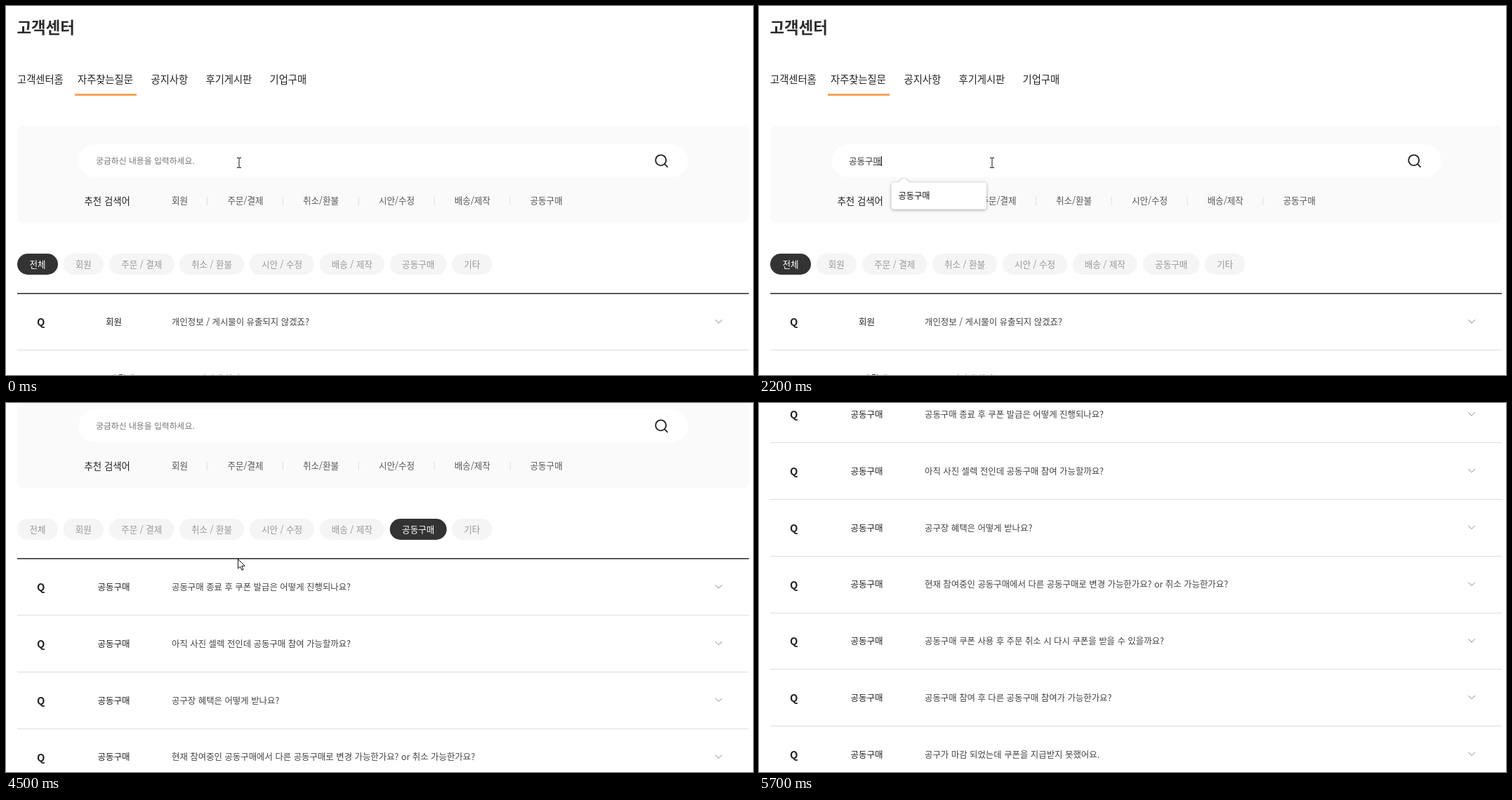
Write an HTML page that moves like this. It is 1064 by 526 pixels and loops after 6200 ms.

```html
<!DOCTYPE html>
<html lang="ko">
<head>
<meta charset="utf-8">
<title>고객센터</title>
<style>
html, body { margin: 0; width: 100%; height: 100%; overflow: hidden; background: #fff; }
svg { display: block; width: 1064px; height: 526px; }
text { font-family: "Noto Sans CJK KR", "Noto Sans CJK JP", "Noto Sans CJK", sans-serif; white-space: pre; }
</style>
</head>
<body>
<svg id="stage" viewBox="0 0 1064 526"></svg>
<script>
const LOOP = 6200, ROW = 80.75, BODY = 12.42;
const NS = 'http://www.w3.org/2000/svg';
const stage = document.getElementById('stage');

function add(parent, tag, attrs = {}) {
  const el = document.createElementNS(NS, tag);
  for (const k in attrs) el.setAttribute(k, attrs[k]);
  return parent.appendChild(el);
}
// Text placed by the vertical centre of its glyphs.
function label(parent, str, x, cy, size, fill, weight = 400, anchor = 'start') {
  const el = add(parent, 'text', {
    x, y: cy + size * 0.38, 'font-size': size, fill, 'font-weight': weight, 'text-anchor': anchor
  });
  el.textContent = str;
  return el;
}
const box = (parent, x, y, width, height, rx, fill) =>
  add(parent, 'rect', { x, y, width, height, rx, fill });
const line = (parent, d, stroke, w) =>
  add(parent, 'path', { d, stroke, 'stroke-width': w, fill: 'none' });
const show = (el, on) => el.setAttribute('visibility', on ? 'visible' : 'hidden');

const page = add(stage, 'g');

// Heading and tabs
label(page, '고객센터', 15.5, 30.5, 22.4, '#2b2b2b', 700);
[['고객센터홈', 16], ['자주찾는질문', 102], ['공지사항', 206.5], ['후기게시판', 284.5], ['기업구매', 375.5]]
  .forEach(([s, x]) => label(page, s, x, 105, 14.3, '#222', 300));
box(page, 98, 125, 88, 3, 0, '#f5a55a');

// Search panel
box(page, 16, 170.5, 1042, 139, 9, '#fafafa');
box(page, 103.5, 197, 868, 47, 23.5, '#fff');
const hint = label(page, '궁금하신 내용을 입력하세요.', 128, 220.5, 11.85, '#777', 300);
add(page, 'circle', { cx: 932.7, cy: 219.8, r: 7.5, fill: 'none', stroke: '#222', 'stroke-width': 1.8 });
line(page, 'M938.2 225.3L942.5 229.8', '#222', 1.8);
label(page, '추천 검색어', 111.5, 277.5, 13.4, '#222', 500);
[['회원', 236], ['주문/결제', 315.5], ['취소/환불', 423], ['시안/수정', 531], ['배송/제작', 638.8], ['공동구매', 746.5]]
  .forEach(([s, x], i) => {
    label(page, s, x, 277.5, 12.55, '#555', 300);
    if (i) box(page, 178 + i * 107.9, 272, 1, 12, 0, '#ddd');
  });

// Category pills
const pills = [['전체', 16, 58], ['회원', 81.5, 57.5], ['주문 / 결제', 147, 92.5], ['취소 / 환불', 246.7, 92.5],
  ['시안 / 수정', 347, 92], ['배송 / 제작', 446.7, 92], ['공동구매', 546.7, 81], ['기타', 635, 57.5]]
  .map(([s, x, w]) => ({
    bg: box(page, x, 353, w, 30, 15, '#f5f5f5'),
    txt: label(page, s, x + w / 2, 368, 12.55, '#999', 400, 'middle')
  }));
function pick(n) {
  pills.forEach((p, i) => {
    p.bg.setAttribute('fill', i === n ? '#333' : '#f5f5f5');
    p.txt.setAttribute('fill', i === n ? '#fff' : '#999');
    p.txt.setAttribute('font-weight', i === n ? 500 : 400);
  });
}

// Question lists
box(page, 16, 409, 1042, 1.6, 0, '#333');
function list(rows) {
  const g = add(page, 'g');
  rows.forEach(([cat, q], i) => {
    const y = 450.3 + i * ROW;
    label(g, 'Q', 49.7, y + 0.5, 14.8, '#222', 700, 'middle');
    label(g, cat, 153.5, y, 12.5, '#222', 500, 'middle');
    label(g, q, 236, y, BODY, '#444', 300);
    line(g, `M1010.3 ${y - 3}l4.8 4.8l4.8 -4.8`, '#888', 1);
    box(g, 16, Math.round(y + 40), 1042, 1, 0, '#ddd');
  });
  return g;
}
const allList = list([
  ['회원', '개인정보 / 게시물이 유출되지 않겠죠?'],
  ['주문 / 결제', '주문은 어떻게 하나요?']
]);
const groupList = list([
  '공동구매 종료 후 쿠폰 발급은 어떻게 진행되나요?',
  '아직 사진 셀렉 전인데 공동구매 참여 가능할까요?',
  '공구장 혜택은 어떻게 받나요?',
  '현재 참여중인 공동구매에서 다른 공동구매로 변경 가능한가요? or 취소 가능한가요?',
  '공동구매 쿠폰 사용 후 주문 취소 시 다시 쿠폰을 받을 수 있을까요?',
  '공동구매 참여 후 다른 공동구매 참여가 가능한가요?',
  '공구가 마감 되었는데 쿠폰을 지급받지 못했어요.'
].map(q => ['공동구매', q]));

// Typed value with caret and composing underline
const CHAR = 11.5;
const field = add(stage, 'g');
const typed = label(field, '', 128, 220.8, 12.5, '#333');
const under = box(field, 128, 226, CHAR, 1, 0, '#333');
const caret = box(field, 128, 214, 1, 14, 0, '#000');

// Suggestion popup
const popup = add(stage, 'g', { style: 'filter:drop-shadow(0 1px 2px rgba(0,0,0,.35))' });
add(popup, 'path', { d: 'M198 252l8.3 -7l8.3 7z', fill: '#fff' });
const sheet = box(popup, 188.5, 251.5, 135.5, 163, 4, '#fff');
const items = [0, 1, 2, 3, 4].map(i => label(popup, '', 198.5, 270.5 + i * 31.3, 12.2, '#111'));
function suggest(words) {
  sheet.setAttribute('height', 7 + words.length * 31.3);
  items.forEach((el, i) => el.textContent = words[i] || '');
}

// Pointers
const beam = line(stage, 'M329 216.5h2.5l.5 .5l.5 -.5h2.5M332 217v13M329 230.5h2.5l.5 -.5l.5 .5h2.5', '#111', 1);
const arrow = add(stage, 'path', {
  d: 'M330.5 222.5v13.5l3.1 -2.9l2.3 5.2l2.2 -1l-2.3 -5h4.3z',
  fill: '#fff', stroke: '#111', 'stroke-width': 1
});

const FIVE = ['공구', '공동구매', '공구가 마감', '공동', '공구장'];
const TWO = ['공동구매', '공동'], ONE = ['공동구매'], NONE = [];
// time, value, suggestions, composing
const typing = [
  [0, '', NONE, 0], [800, 'ㄱ', NONE, 1], [900, '고', NONE, 1], [1000, '공', NONE, 1],
  [1100, '공', FIVE, 1], [1300, '공ㄷ', FIVE, 1], [1600, '공도', NONE, 1], [1700, '공동', TWO, 1],
  [1800, '공동ㄱ', NONE, 1], [1900, '공동구', ONE, 1], [2000, '공동굼', NONE, 1],
  [2100, '공동구매', ONE, 1], [2300, '공동구매', NONE, 1], [2500, '공동구매', NONE, 0]
];
const scroll = [
  [0, 0], [4000, 27], [4100, 116], [4200, 161], [4500, 188], [4600, 277], [4700, 323],
  [4900, 326], [5000, 342], [5100, 369], [5200, 397], [5300, 418], [5400, 430], [5500, 434]
];
const at = (table, t) => table.filter(s => s[0] <= t).pop();

function draw(t) {
  const loaded = t >= 2700;
  const [, value, words, composing] = at(typing, t);
  const n = value.length;

  page.setAttribute('transform', `translate(0 ${-at(scroll, t)[1]})`);
  page.setAttribute('display', loaded && t < 2900 ? 'none' : 'inline');
  show(allList, !loaded);
  show(groupList, loaded);
  pick(loaded ? 6 : 0);
  show(hint, loaded || !n);

  field.setAttribute('display', loaded ? 'none' : 'inline');
  typed.textContent = value;
  caret.setAttribute('x', 128 + n * CHAR);
  show(caret, t >= 300);
  under.setAttribute('x', 128 + (n - 1) * CHAR);
  show(under, composing);

  popup.setAttribute('display', !loaded && words.length ? 'inline' : 'none');
  suggest(words);
  show(beam, !loaded);
  show(arrow, loaded && t < 5600);
}

const start = performance.now();
function tick() {
  draw((performance.now() - start) % LOOP);
  requestAnimationFrame(tick);
}
tick();
</script>
</body>
</html>
```
